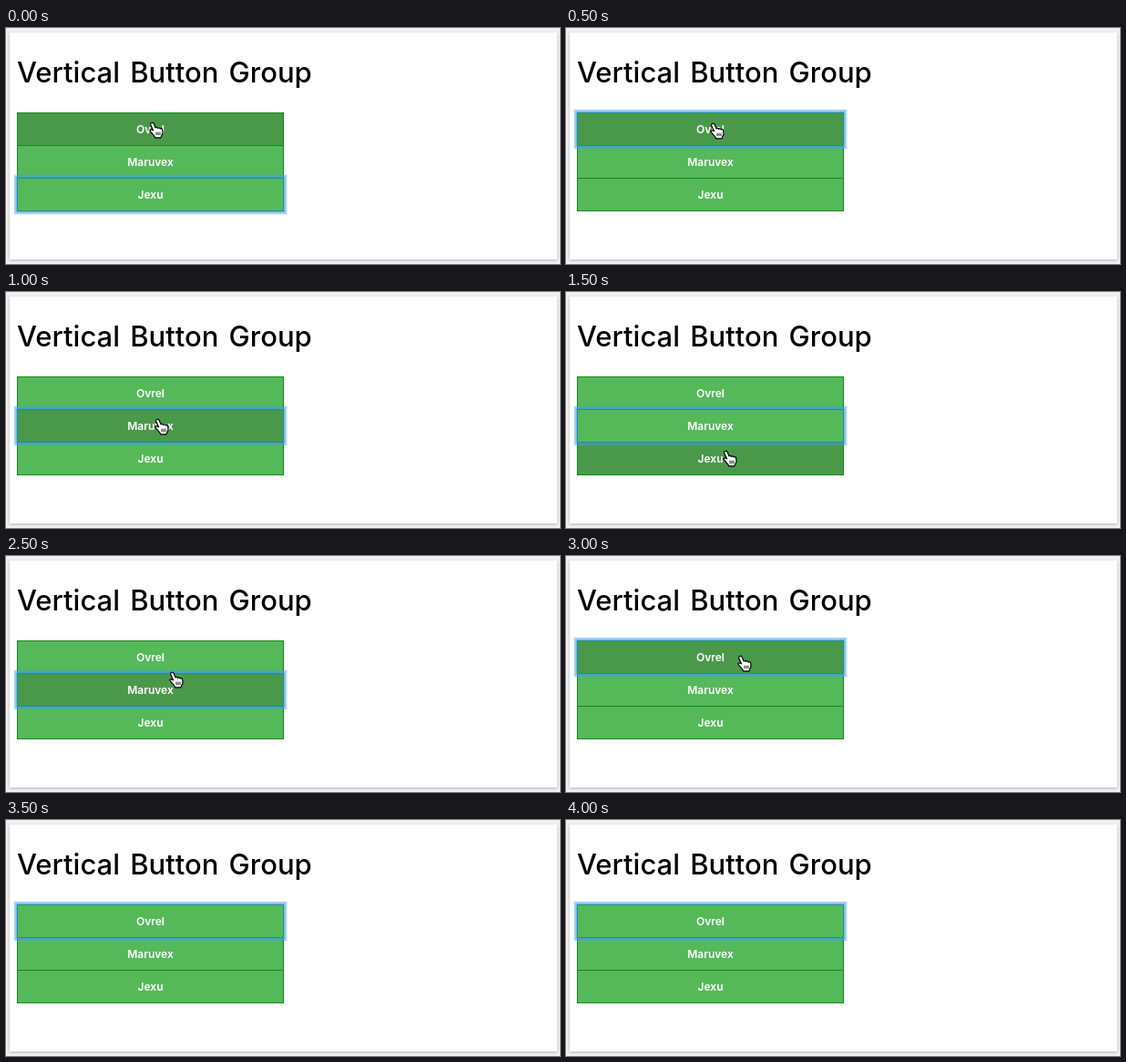
An HTML page that plays this animation: 608 px wide and 260 px high, repeating every 5 s.

```html
<!DOCTYPE html>
<html lang="en">
<head>
<meta charset="utf-8">
<title>Vertical Button Group</title>
<style>
  html, body { margin: 0; width: 100%; height: 100%; overflow: hidden; background: #f1f1f1; }
  .card { position: absolute; left: 4px; top: 5px; width: 601px; height: 250px; background: #fff; box-shadow: 0 1px 3px #0004; }
  h1 { position: absolute; left: 12px; top: 25px; margin: 0; font: 500 31px/48px Inter, sans-serif; word-spacing: 3px; white-space: nowrap; color: #000; }
  .button {
    position: absolute; left: 12px; width: 293px; height: 37px; box-sizing: border-box;
    border: 1px solid #128a1e; background: #55b95a; color: #fff;
    font: 600 12px/35px Inter, sans-serif; text-align: center;
  }
  .hover { background: #4a994b; }
  .focus {
    z-index: 1; border-color: #248f80;
    box-shadow: 0 0 0 1px #3b99fc4d, 0 0 0 2px #3b99fc40, 0 0 0 3px #3b99fc4d, 0 0 0 4px #3b99fc1f;
  }
  #cursor { position: absolute; left: 0; top: 0; z-index: 2; }
</style>
</head>
<body>
<div class="card"></div>
<h1>Vertical Button Group</h1>
<div class="button" style="top:93px">Ovrel</div>
<div class="button" style="top:129px">Maruvex</div>
<div class="button" style="top:165px">Jexu</div>
<svg id="cursor" width="18" height="20">
  <path d="M3.2 1.2C1.6 1.5 1.4 3 2 4.2L4.6 9.8C3.2 8.6 1.2 8.4.9 9.6.7 10.6 2.6 12 4 13.8 5 15 6.2 15.8 6.6 17.8H13C13.2 15.8 14.9 14.6 15 12.4L14.6 8.8C14.2 7.4 12.8 7.3 12.3 8 11.8 6.6 10.1 6.5 9.6 7.4 9 6.2 7.5 6.2 7 6.8L5.2 2.4C4.8 1.4 4 1 3.2 1.2Z" fill="#fff" stroke="#000" stroke-width="1.2" stroke-linejoin="round"/>
  <path d="M8 11.6V15M10 11.6V15M12 11.6V15" stroke="#000" stroke-width=".9"/>
</svg>
<script>
  const STEP = 500, LOOP = 5000;
  const buttons = document.querySelectorAll(".button");
  const cursor = document.getElementById("cursor");

  // One entry per step: hovered button, focused button, cursor position
  const steps = [
    [0, 2, 157, 103],
    [0, 0, 158, 104],
    [1, 1, 163, 139],
    [2, 1, 172, 174],
    [2, 2, 175, 174],
    [1, 1, 179, 127],
    [0, 0, 188, 109],
    [-1, 0]
  ];

  function draw(now) {
    const index = Math.floor(now % LOOP / STEP);
    const [hover, focus, x, y] = steps[Math.min(index, steps.length - 1)];
    buttons.forEach((button, i) => {
      button.classList.toggle("hover", i === hover);
      button.classList.toggle("focus", i === focus);
    });
    cursor.style.display = hover < 0 ? "none" : "block";
    if (hover >= 0) cursor.style.transform = `translate(${x}px, ${y}px)`;
  }

  function tick() {
    draw(performance.now());
    requestAnimationFrame(tick);
  }
  tick();
</script>
</body>
</html>
```
